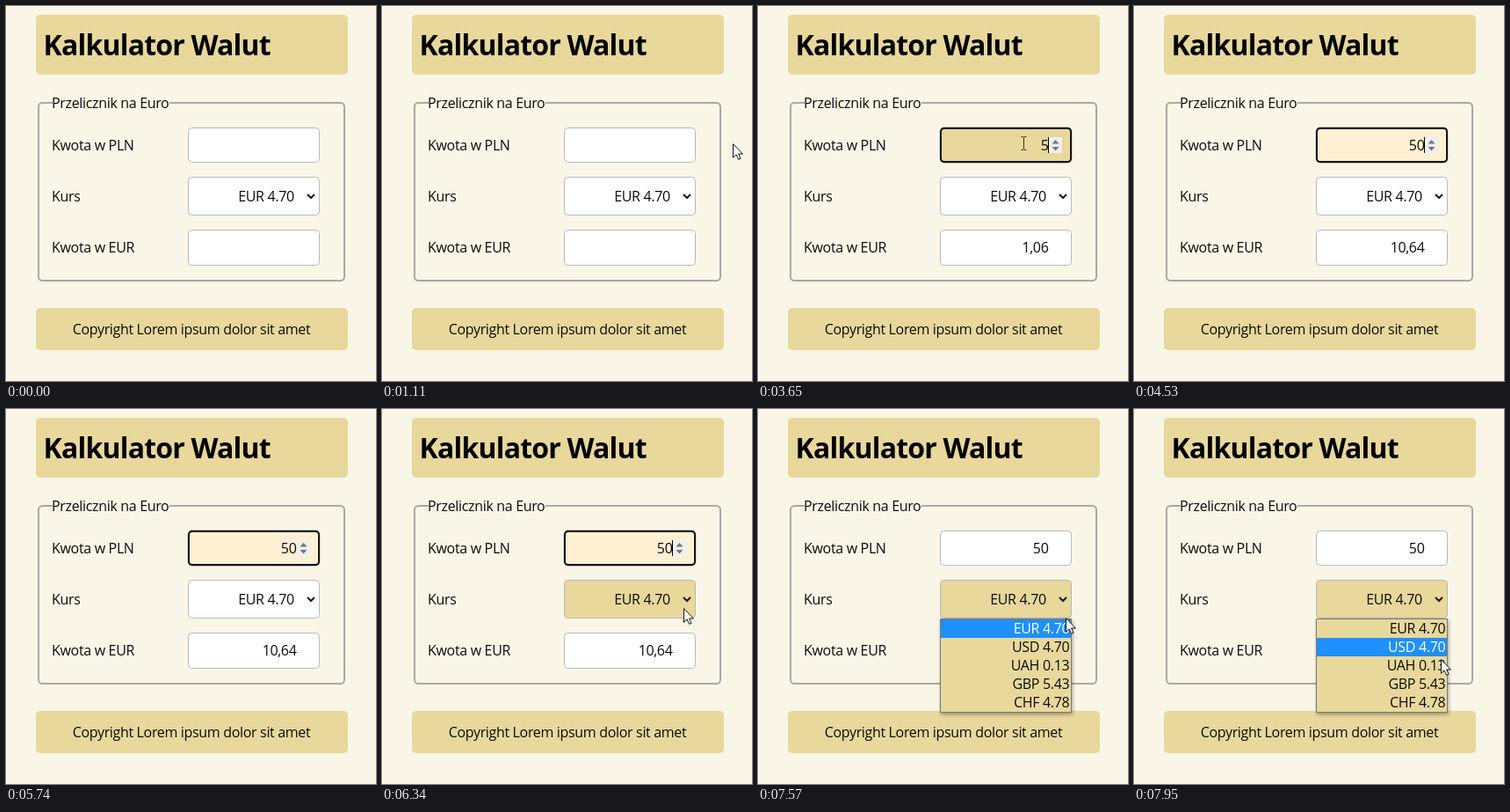
Write an HTML page that moves like this. It is 421 px wide and 426 px high and loops after 8 s.

```html
<!DOCTYPE html>
<html lang="pl">
<head>
<meta charset="utf-8">
<title>Kalkulator Walut</title>
<style>
  html, body { margin: 0; width: 100%; height: 100%; overflow: hidden; background: #faf6e7; }
  svg { display: block; width: 421px; height: 426px; }
  text { font: 16px "Open Sans", "Noto Sans", sans-serif; letter-spacing: -.33px; fill: #0c0c0c; }
  .title { font-size: 32px; font-weight: 700; letter-spacing: -.8px; fill: #000; }
  .end { text-anchor: end; }
  .mid { text-anchor: middle; }
  .bar { fill: #e8d89c; }
  .field { fill: #fff; stroke: #b9b9b7; }
  .hover { fill: #e8d89c; }
  .fade { fill: #f4e4b9; }
  .focus { fill: #ffefd3; }
  #menu { filter: drop-shadow(1px 2px 2px rgba(0, 0, 0, .35)); }
  .on rect { fill: #1e90ff; }
  .on text { fill: #fff; }
</style>
</head>
<body>
<svg viewBox="0 0 421 426">
  <rect width="421" height="426" fill="#faf6e7"/>
  <rect class="bar" x="34" y="10" width="355" height="68" rx="5"/>
  <text class="title" x="42.5" y="56">Kalkulator Walut</text>

  <rect x="37" y="110" width="348" height="202" rx="4.5" fill="none" stroke="#a9a9a7" stroke-width="2"/>
  <rect x="53" y="108" width="133" height="4" fill="#faf6e7"/>
  <text x="52" y="116">Przelicznik na Euro</text>
  <text x="52" y="164">Kwota w PLN</text>
  <text x="52" y="222">Kurs</text>
  <text x="52" y="280">Kwota w EUR</text>

  <rect id="amount" class="field" x="207.5" y="138.5" width="149" height="39" rx="4"/>
  <rect id="ring" x="207.9" y="138.9" width="148.2" height="38.2" rx="4" fill="none" stroke="#101010" stroke-width="2.1"/>
  <g id="spin">
    <rect x="331" y="149" width="15" height="18" fill="#efefef"/>
    <path d="M334.5 156.5l4-4.5 4 4.5zM334.5 160l4 4.5 4-4.5z" fill="#757575"/>
  </g>
  <text id="value" class="end" x="330.5" y="164"></text>
  <rect id="caret" x="330" y="149" width="1" height="18"/>

  <rect id="rate" class="field" x="207.5" y="194.5" width="149" height="43" rx="4"/>
  <text class="end" x="327.8" y="222">EUR 4.70</text>
  <path d="M343 214l4 4 4-4" fill="none" stroke="#111" stroke-width="2"/>

  <rect class="field" x="207.5" y="254.5" width="149" height="40" rx="4"/>
  <text id="result" class="end" x="330.5" y="280"></text>

  <rect class="bar" x="34" y="343" width="355" height="48" rx="5"/>
  <text class="mid" x="211" y="373">Copyright Lorem ipsum dolor sit amet</text>

  <circle id="click" r="12.5" fill="#f5e31e"/>
  <g id="menu">
    <rect class="bar" x="207.5" y="238.5" width="149" height="106" stroke="#7a7a78"/>
  </g>

  <g id="pointer">
    <path id="arrow" d="M.5 .7V16.3L4.1 12.9 6.6 18.4 9 17.3 6.6 12H11.4z" fill="#fff" stroke="#111" stroke-linejoin="round"/>
    <path id="beam" d="M-3 -7.5H-.5M.5 -7.5H3M0 -7V7M-3 7.5H-.5M.5 7.5H3" fill="none" stroke="#333"/>
  </g>
</svg>
<script>
const LOOP = 8000;
const $ = id => document.getElementById(id);

const rows = ["EUR 4.70", "USD 4.70", "UAH 0.13", "GBP 5.43", "CHF 4.78"].map((label, i) => {
  const g = document.createElementNS("http://www.w3.org/2000/svg", "g");
  const y = 239 + 21 * i;
  g.innerHTML = `<rect x="208" y="${y}" width="148" height="21" fill="none"/>
    <text class="end" x="354.3" y="${y + 16}">${label}</text>`;
  $("menu").append(g);
  return g;
});

const start = {
  cursor: "", x: 404, y: 157, click: 0, amount: "", rate: "",
  ring: 0, spin: 0, caret: 0, value: "", result: "", menu: 0, row: 0
};

// Each step changes part of the state and holds until the next one.
const steps = [
  [100, { cursor: "arrow" }],
  [390, { y: 156 }],
  [1020, { x: 399 }],
  [1120, { x: 384 }],
  [1220, { x: 361 }],
  [1310, { x: 338, amount: "hover", spin: 1 }],
  [1410, { x: 320.5, cursor: "beam" }],
  [1510, { x: 311.5 }],
  [1830, { x: 306.5 }],
  [1910, { x: 302.5 }],
  [2220, { click: .75, ring: 1, caret: 1 }],
  [2320, { click: 0 }],
  [2820, { caret: 0 }],
  [3320, { caret: 1 }],
  [3650, { value: "5", result: "1,06" }],
  [4140, { value: "50", result: "10,64" }],
  [4440, { cursor: "", amount: "fade" }],
  [4530, { amount: "focus" }],
  [4630, { caret: 0 }],
  [5150, { caret: 1 }],
  [5740, { caret: 0 }],
  [6150, { cursor: "arrow", x: 389, y: 214 }],
  [6240, { x: 353, y: 224, rate: "hover", caret: 1 }],
  [6340, { x: 343, y: 226 }],
  [6740, { click: .75, amount: "", ring: 0, spin: 0, caret: 0, menu: 1 }],
  [6850, { click: .35 }],
  [6950, { click: 0, x: 347, y: 225 }],
  [7040, { x: 350, y: 223 }],
  [7450, { y: 227 }],
  [7550, { y: 237 }],
  [7650, { y: 252 }],
  [7750, { y: 267 }],
  [7850, { y: 279, row: 1 }],
  [7950, { x: 349, y: 284 }]
];

const show = (id, on) => { $(id).style.display = on ? "" : "none"; };

function draw(time) {
  const s = { ...start };
  for (const [at, change] of steps) if (at <= time) Object.assign(s, change);

  for (const id of ["ring", "spin", "caret", "menu"]) show(id, s[id]);
  for (const id of ["amount", "rate"]) $(id).setAttribute("class", "field " + s[id]);
  for (const id of ["value", "result"]) $(id).textContent = s[id];
  for (const id of ["arrow", "beam"]) show(id, s.cursor === id);
  rows.forEach((row, i) => row.classList.toggle("on", i === s.row));

  const place = `translate(${s.x} ${s.y})`;
  $("pointer").setAttribute("transform", place);
  $("click").setAttribute("transform", place);
  $("click").style.opacity = s.click;
}

const began = performance.now();
function tick() {
  draw((performance.now() - began) % LOOP);
  requestAnimationFrame(tick);
}
tick();
</script>
</body>
</html>
```
